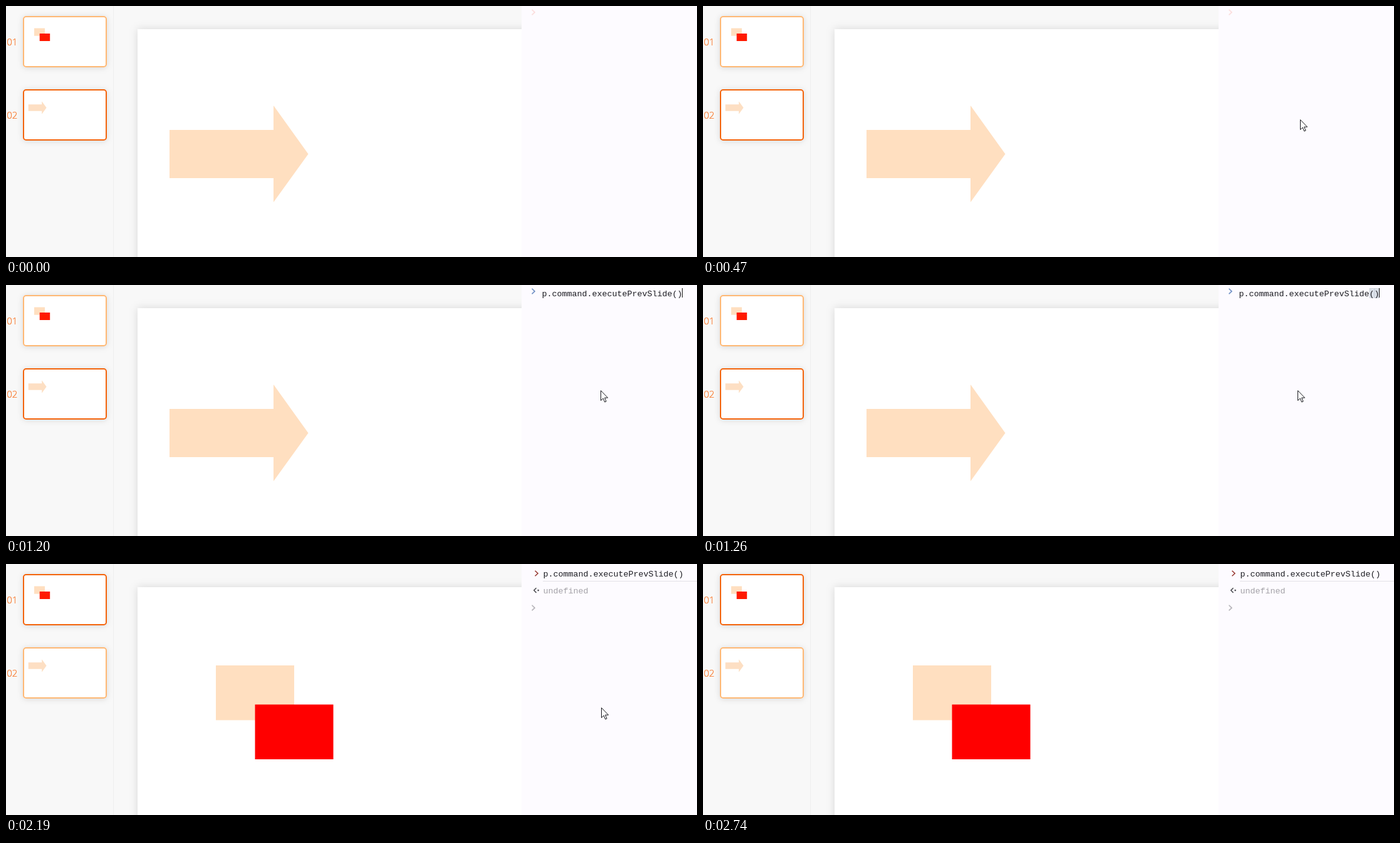
These frames come from a looping animation (1103x401 px, 2.81 s). An HTML page:

```html
<!DOCTYPE html>
<html lang="en">
<head>
<meta charset="utf-8">
<title>Previous slide command</title>
<style>
  html, body { margin: 0; width: 100%; height: 100%; overflow: hidden; background: #f8f8f8; }
  svg { display: block; width: 1103px; height: 401px; }
  .label { font: 300 15px "Open Sans", "Noto Sans", sans-serif; fill: #f8701f; stroke: #f8701f; stroke-width: .2; }
  .code { font: 13.333px "Liberation Mono", monospace; fill: #1c1c22; white-space: pre; }
  .chev { fill: none; stroke-width: 1.5; }
  .peach { fill: #ffdfc0; }
  .thumb { fill: #fff; stroke-width: 2; }
  .paper { fill: #fff; filter: drop-shadow(0 0 7px rgba(0, 0, 0, .13)); }
  .card { fill: #fff; filter: drop-shadow(0 1px 5px rgba(0, 0, 0, .13)); }
</style>
</head>
<body>
<svg viewBox="0 0 1103 401">
  <defs>
    <path id="chev" d="M.5 0l4.5 4.2-4.5 4.2"/>
  </defs>
  <rect width="1103" height="401" fill="#f8f8f8"/>

  <!-- editing area -->
  <rect class="paper" x="210" y="37" width="800" height="450"/>
  <path id="arrow" class="peach" d="M261 198H427V159L482.5 236.5 427 313.5V275H261Z"/>
  <g id="boxes">
    <rect class="peach" x="335" y="162" width="125" height="87.5"/>
    <rect x="397.5" y="224.5" width="125" height="87.5" fill="#f00"/>
  </g>

  <!-- slide list -->
  <rect x="171" width="1" height="401" fill="#eee"/>
  <rect class="card" x="27" y="16" width="134" height="82" rx="5"/>
  <rect class="card" x="27" y="133" width="134" height="82" rx="5"/>
  <rect id="thumb1" class="thumb" x="28" y="17" width="132" height="80" rx="4"/>
  <rect id="thumb2" class="thumb" x="28" y="134" width="132" height="80" rx="4"/>
  <rect class="peach" x="45" y="35.5" width="17" height="12.2"/>
  <rect x="53.7" y="44" width="16.5" height="12" fill="#ff1a00"/>
  <path fill="#fddfc3" d="M35.7 157.3H57.2V152.3L64.6 162.5 57.2 172.7V167.7H35.7Z"/>
  <text class="label" x="1.3" y="63">01</text>
  <text class="label" x="1.3" y="180">02</text>

  <!-- console -->
  <rect x="823" width="280" height="401" fill="#fdfbff"/>
  <g id="match" fill="#dce2ea" stroke="#c3cad3" stroke-width=".6">
    <rect x="1064" y="5.5" width="7.7" height="15"/>
    <rect x="1072" y="5.5" width="7.7" height="15"/>
  </g>
  <text id="typed" class="code" x="855.5" y="17.5">p.command.executePrevSlide()</text>
  <g id="sent">
    <use href="#chev" class="chev" x="844" y="10.8" stroke="#96362f"/>
    <text class="code" x="857.5" y="19.5">p.command.executePrevSlide()</text>
  </g>
  <g id="result">
    <rect x="857" y="27" width="246" height="1" fill="#e3e1e7"/>
    <path class="chev" d="M846.5 38.3l-3.8 3.8 3.8 3.8" stroke="#4c4c52"/>
    <circle cx="849.6" cy="42.1" r="1.3" fill="#4c4c52"/>
    <text class="code" x="857.5" y="46.5" style="fill:#a3a1a7">undefined</text>
  </g>
  <use id="prompt" href="#chev" class="chev" x="839" y="5.8"/>
  <rect id="caret" x="855" y="5" width="1" height="15" fill="#111"/>

  <path id="pointer" fill="#fff" stroke="#16161c" stroke-width="1" stroke-linejoin="miter"
    d="M.5.7V16.6L4.2 13.1 6.7 19 9.1 18 6.6 12.2H11.6Z"/>
</svg>
<script>
  const LOOP = 2810;

  // Each row of a table is [start in ms, value held until the next row].
  function hold(id, prop, rows) {
    const frames = rows.map(([ms, value]) =>
      ({ offset: ms / LOOP, [prop]: value, easing: "step-end" }));
    frames.push({ offset: 1, [prop]: rows[rows.length - 1][1] });
    document.getElementById(id).animate(frames, { duration: LOOP, iterations: Infinity });
  }

  // Visible only between the listed on/off times.
  function show(id, ...times) {
    const rows = times.map((ms, i) => [ms, i % 2 ? "hidden" : "visible"]);
    if (times[0] > 0) rows.unshift([0, "hidden"]);
    hold(id, "visibility", rows);
  }

  const at = (x, y) => `translate(${x}px, ${y}px)`;
  const SEND = 1660, REPLY = 1720;
  const ACTIVE = "#f4640c", IDLE = "#ffb874";

  show("arrow", 0, SEND);
  show("boxes", SEND);
  hold("thumb1", "stroke", [[0, IDLE], [SEND, ACTIVE]]);
  hold("thumb2", "stroke", [[0, ACTIVE], [SEND, IDLE]]);

  show("typed", 1200, SEND);
  show("match", 1260, SEND);
  show("sent", SEND);
  show("result", REPLY);

  hold("prompt", "stroke", [[0, "#fbdad9"], [1200, "#6486bf"], [SEND, "#efc3b4"], [REPLY, "#aeacb2"]]);
  hold("prompt", "transform", [[0, at(0, 0)], [SEND, at(0, 32)], [REPLY, at(0, 60)]]);

  show("caret", 600, 1790, 2260, 2740);
  hold("caret", "transform", [[0, at(0, 0)], [1200, at(224, 0)], [SEND, at(0, 32)], [REPLY, at(0, 60)]]);

  show("pointer", 130, 2460);
  hold("pointer", "transform", [
    [0, at(1062, 388)], [130, at(1062, 388)], [200, at(1012, 296)], [270, at(970, 220)],
    [340, at(957, 194)], [410, at(953, 181)], [540, at(951, 171)], [600, at(950, 168)],
    [670, at(949, 168)], [2190, at(950, 229)], [2260, at(977, 283)],
    [2320, at(1022, 338)], [2390, at(1076, 391)]
  ]);
</script>
</body>
</html>
```
